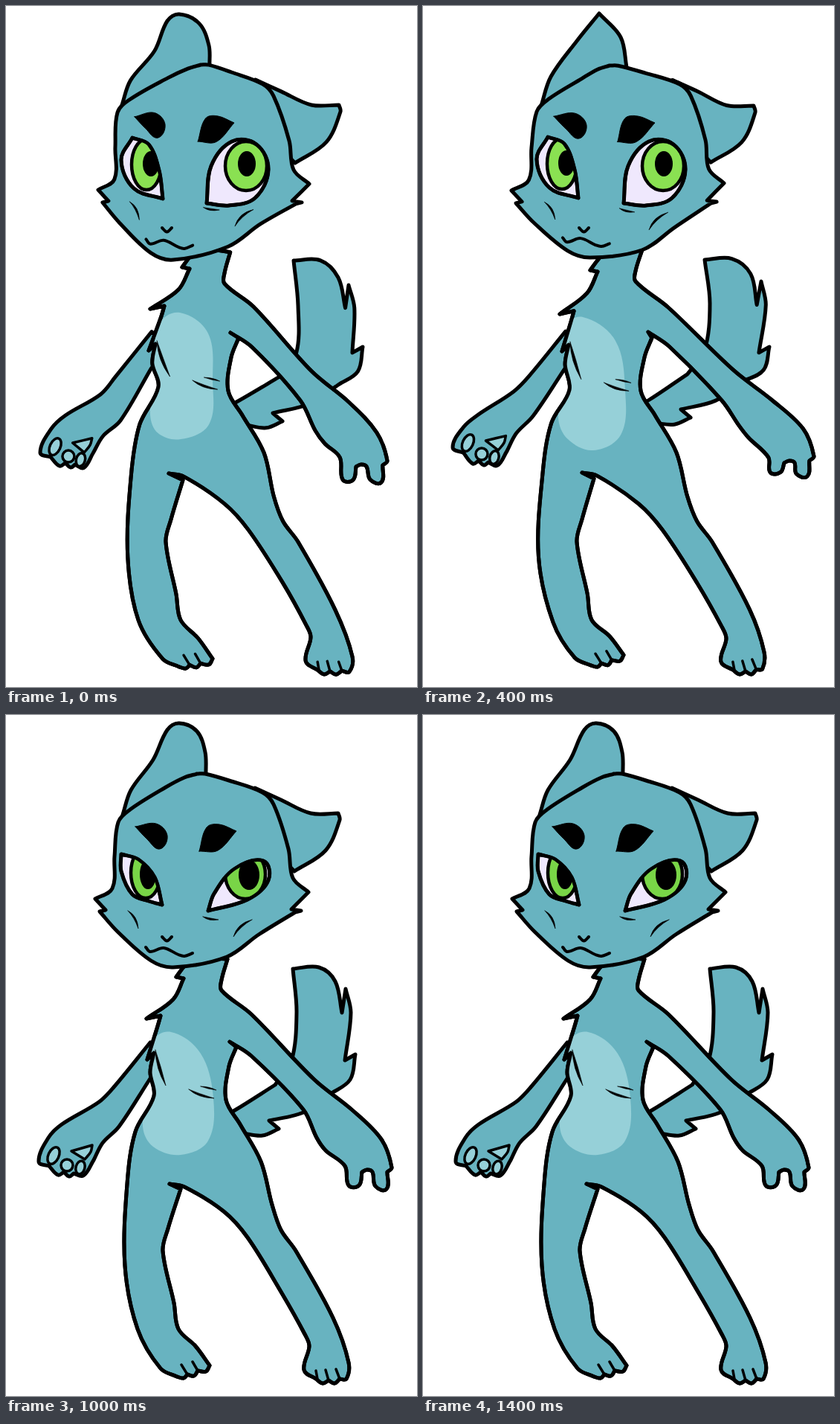
An HTML page that plays this animation: 553x915 px, repeating every 1.6 s.

```html
<!DOCTYPE html>
<html lang="en">
<head>
<meta charset="utf-8">
<title>Swaying cat</title>
<style>
html, body { margin: 0; width: 100%; height: 100%; overflow: hidden; background: #fff; }
svg { display: block; width: 100%; height: 100%; }
</style>
</head>
<body>
<svg id="stage" viewBox="0 0 553 915"></svg>
<script>
const FUR = '#68b3c0', PALE = '#96d0d8', WHITE = '#efe8fd';
const STEP = 200;
const nums = text => text.trim().split(/\s+/).map(Number);

// Each sway maps an anchor (x y) to its shift leaning back and leaning front.
// Points in between follow the anchors closest to them.
function sway(text) {
  const anchors = text.split(',').map(nums);
  return lean => ([x, y]) => {
    if (!lean) return [x, y];
    let sum = 0, dx = 0, dy = 0;
    for (const a of anchors) {
      const w = 1 / ((x - a[0]) ** 2 + (y - a[1]) ** 2 + 1) ** 1.5;
      const k = lean < 0 ? 2 : 4;
      sum += w;
      dx += w * a[k];
      dy += w * a[k + 1];
    }
    return [x + dx / sum, y + dy / sum];
  };
}

const headSway = sway('224 12 0 0 0 0, 268 50 5 3 5 5, 157 134 -1 -1 2 -2, 257 79 5 0 -6 1, 447 135 1 1 -2 2, 147 200 1 0 0 0, 120 247 4 0 -1 1, 225 339 0 2 0 -1, 320 312 2 -2 -2 3, 407 238 1 1 -2 0, 380 180 1 1 0 0, 215 165 -3 -3 3 -2, 310 156 -3 1 2 1');
const flankSway = sway('229 352 8 -1 -4 3, 189 408 5 -1 -5 6, 192 460 2 0 -3 1, 199 512 6 0 -2 4, 168 590 6 3 -1 0, 159 700 4 0 -5 0, 177 825 1 0 -2 3, 230 889 3 -1 -4 -3, 274 874 4 3 -4 -2, 229 815 3 0 -5 0, 211 712 4 0 -4 0, 235 637 3 0 -5 -2');
const legSway = sway('220 630 -1 -2 -6 -3, 311 683 1 2 -3 2, 408 848 2 0 0 2, 430 895 2 0 0 0, 461 870 5 4 -2 -2, 390 720 3 0 -1 0, 343 600 4 0 -2 0, 296 517 3 0 -3 0, 300 472 3 0 -2 0');
const armSway = sway('301 439 1 0 2 -1, 400 530 -4 0 2 0, 430 585 -1 3 8 -5, 458 615 -7 0 9 1, 468 635 -8 5 6 -6, 486 611 -8 5 7 0, 507 637 -7 3 5 -5, 519 608 -6 3 7 -3, 465 530 -4 2 4 -1, 330 402 3 2 0 3, 290 365 4 3 -4 0');
const bellySway = sway('222 426 12 -14 -7 -8, 190 490 9 -10 -2 0, 184 553 10 -4 -2 0, 235 591 0 -9 -6 6, 279 515 -1 -12 -7 2, 262 455 10 -15 -3 -5');
const tailSway = sway('386 341 1 1 -7 0, 457 368 4 7 -2 2, 470 456 10 2 -4 2, 430 510 12 -1 -6 -5, 354 545 5 2 -7 -3, 308 531 4 0 -5 -1, 390 400 2 3 -5 0');
const pawSway = sway('44 600 2 0 -4 -7, 75 550 5 0 -2 0, 78 614 2 0 -3 -3, 118 598 -1 3 -5 0, 152 553 2 4 -4 -2, 168 478 2 -3 -2 -3');

const same = p => p;
const pairs = (text, bend) => {
  const n = nums(text), p = [];
  for (let i = 0; i < n.length; i += 2) p.push(bend([n[i], n[i + 1]]));
  return p;
};

// Smooth line through x y pairs; "/" makes the point before it a corner.
function curve(text, bend = same, from = null) {
  const parts = text.split('/');
  let d = '', last = from;
  for (const part of parts) {
    const p = pairs(part, bend);
    if (last) p.unshift(last);
    else d = 'M' + p[0];
    const end = p.length - 1;
    const loop = parts.length === 1 && String(p[0]) === String(p[end]);
    const at = i => p[i] || (loop ? p[i < 0 ? end - 1 : 1] : p[i < 0 ? 0 : end]);
    for (let i = 0; i < end; i++) {
      const b = p[i], c = p[i + 1];
      const len = Math.hypot(c[0] - b[0], c[1] - b[1]) * 0.34;
      const handle = (o, u, v, sign) => {
        const r = len / (Math.hypot(v[0] - u[0], v[1] - u[1]) || 1) * sign;
        return [o[0] + (v[0] - u[0]) * r, o[1] + (v[1] - u[1]) * r];
      };
      d += `C${handle(b, at(i - 1), c, 1)} ${handle(c, b, at(i + 2), -1)} ${c}`;
    }
    last = p[end];
  }
  return d;
}

const path = (d, fill, width = 5) =>
  `<path d="${d}" fill="${fill}" stroke="#000" stroke-width="${width}"/>`;
const shape = (text, bend, fill = FUR, width = 5) => path(curve(text, bend) + 'Z', fill, width);
const clip = (id, d) => `<clipPath id="${id}"><path d="${d}"/></clipPath>`;

function oval(text, bend, fill, width) {
  const [cx, cy, rx, ry, turn = 0] = nums(text);
  const [x, y] = bend([cx, cy]);
  return `<ellipse cx="${x}" cy="${y}" rx="${rx}" ry="${ry}" fill="${fill}" stroke="#000" stroke-width="${width}" transform="rotate(${turn} ${x} ${y})"/>`;
}

// A short stroke that tapers at both ends.
function taper(text, bend, w) {
  const [a, c, b] = pairs(text, bend);
  const len = Math.hypot(b[0] - a[0], b[1] - a[1]);
  const nx = (a[1] - b[1]) / len * w, ny = (b[0] - a[0]) / len * w;
  return path(`M${a}Q${c[0] + nx} ${c[1] + ny} ${b}Q${c[0] - nx} ${c[1] - ny} ${a}Z`, '#000', 0.6);
}

function drawTail(lean) {
  return shape('386 341 421 339 443 358 452 400 / 457 368 / 464 400 456 464 / 470 456 / 463 490 435 510 / 400 534 354 545 / 367 556 / 345 565 318 562 / 290 540 / 308 531 362 497 / 384 465 391 400 386 341', tailSway(lean));
}

function drawPaw(lean) {
  const bend = pawSway(lean);
  const pads = ['64 592 7 12 25', '82 605 8 8', '100 608 6 9 15'];
  return shape('194 440 145 500 125 520 75 550 57 568 44 600 58 606 / 70 618 78 614 / 85 620 91 616 / 104 619 118 598 / 130 575 152 553 193 490 / 215 460', bend) +
    pads.map(p => oval(p, bend, PALE, 3.5)).join('') +
    shape('88 586 / 116 578 / 114 587 106 597 / 88 586', bend, PALE, 3.5);
}

function drawBody(lean, id) {
  const flank = flankSway(lean), leg = legSway(lean), arm = armSway(lean);
  const crotch = flank([235, 637]), pit = leg([310, 446]);
  const body = curve('250 325 / 237 341 229 352 / 239 354 / 225 382 189 408 / 208 404 / 204 418 190 463 / 199 454 / 194 480 199 512 174 560 163 630 160 740 177 825 208 878 230 889 / 239 891 244 886 / 253 888 258 881 / 269 882 274 874 / 255 848 232 825 226 790 211 720 218 690 235 637', flank) +
    curve('220 630 / 240 634 293 667 325 702 370 775 402 832 408 848 401 880 417 892 / 426 898 434 894 / 442 898 449 892 / 458 892 461 870 440 810 390 720 370 692 358 658 343 600 315 550 296 517 300 472 310 446', leg, crotch) +
    curve('301 439 / 330 458 400 530 418 568 430 585 456 606 461 632 475 632 479 614 / 486 611 493 614 497 633 512 637 513 614 / 519 608 505 570 465 530 415 490 330 402 290 370 290 356 298 328', arm, pit) + 'Z';
  const belly = curve('222 426 195 440 190 490 184 553 198 580 235 591 272 572 279 515 262 455 222 426', bellySway(lean));
  const toe = (text, bend) => path(curve(text, bend), 'none', 3.5);
  return clip(id, body) + path(body, FUR) +
    `<path d="${belly}Z" fill="${PALE}" clip-path="url(#${id})"/>` + path(body, 'none') +
    ['236 873 244 886', '251 869 258 881'].map(t => toe(t, flank)).join('') +
    ['417 881 419 892', '430 880 434 894', '444 879 449 892'].map(t => toe(t, leg)).join('') +
    taper('201 450 205 474 215 498', flank, 4) +
    taper('246 503 260 512 280 515', flank, 3) +
    taper('262 499 273 501 283 504', flank, 2);
}

function drawHead(lean) {
  const bend = headSway(lean);
  const ear = lean > 0
    ? shape('159 134 172 95 207 47 237 10 / 266 42 274 82 / 230 120')
    : shape('157 134 168 101 198 60 217 20 233 11 257 22 268 50 269 80 / 230 120', bend);
  return ear +
    shape('335 98 370 114 410 132 447 132 / 449 141 430 182 388 210 / 350 170', bend) +
    shape('257 79 240 84 215 97 167 127 151 144 146 190 143 233 120 247 / 134 262 / 126 264 / 150 291 195 330 225 339 297 325 340 295 389 265 / 397 263 / 384 261 / 407 238 / 386 219 380 180 360 120 345 104 300 88 268 79 257 79', bend) +
    shape('174 150 / 202 146 217 162 207 180 190 167 174 150', bend, '#000', 1) +
    shape('260 183 270 151 287 147 310 156 / 285 182 260 183', bend, '#000', 1) +
    taper('164 263 175 271 178 287', bend, 2.5) +
    taper('331 275 313 282 306 298', bend, 3) +
    taper('265 271 273 275 286 275', bend, 2.5) +
    path(curve('210 298 215 303 218 303 223 298'), 'none', 4) +
    path(curve('188 312 194 318 212 313 232 322 240 324 251 320', bend), 'none', 4);
}

const drawPose = (lean, name) =>
  drawTail(lean) + drawPaw(lean) + drawBody(lean, 'body-' + name) + drawHead(lean);

function eye(id, outline, iris, pupil, green) {
  const rim = curve(outline) + 'Z';
  return clip(id, rim) + path(rim, WHITE) +
    `<g clip-path="url(#${id})">${oval(iris, same, green, 4.5)}${oval(pupil, same, '#000', 0)}</g>` +
    path(rim, 'none', 4.5);
}

function openEyes(id, shift) {
  const green = '#8ae152';
  return `<g transform="translate(${shift} ${shift / 2})">` +
    eye(id + 'L', '209 258 170 244 153 206 168 176 / 190 185 204 220 209 258', '187 212 20 34', '193 211 11 17', green) + '</g>' +
    eye(id + 'R', '270 265 276 215 304 182 337 186 353 220 335 258 300 268 270 265 /270 265', '323 215 28 33', '324 212 12 17', green);
}

const halfEyes = () =>
  eye('halfL', '155 187 178 194 200 218 210 255 / 192 250 170 241 155 210 155 187', '188 212 20 34', '191 214 11 20', '#79d547') +
  eye('halfR', '272 263 280 240 307 207 346 196 353 222 325 248 272 263 / 272 263', '322 214 27 33', '327 215 14 20', '#79d547');

const shutEyes = () =>
  path(curve('152 203 170 209 188 222 209 257'), 'none') +
  path(curve('272 262 302 233 325 225 353 222'), 'none');

const art = {
  back: drawPose(-1, 'back'),
  mid: drawPose(0, 'mid'),
  front: drawPose(1, 'front'),
  wide: openEyes('wide', 2),
  open: openEyes('open', 0),
  half: halfEyes(),
  shut: shutEyes()
};

const timeline = [
  ['back', 'wide'], ['mid', 'open'], ['front', 'open'], ['mid', 'open'],
  ['back', 'wide'], ['mid', 'half'], ['front', 'shut'], ['mid', 'half']
];

const stage = document.getElementById('stage');
stage.innerHTML = Object.entries(art).map(([name, parts]) =>
  `<g id="${name}" stroke-linejoin="round" stroke-linecap="round">${parts}</g>`).join('');
const layers = [...stage.children];

function render(time) {
  const shown = timeline[Math.floor(time / STEP) % timeline.length];
  for (const g of layers) g.style.display = shown.includes(g.id) ? '' : 'none';
}

const start = performance.now();
function tick() {
  render(performance.now() - start);
  requestAnimationFrame(tick);
}
tick();
</script>
</body>
</html>
```
